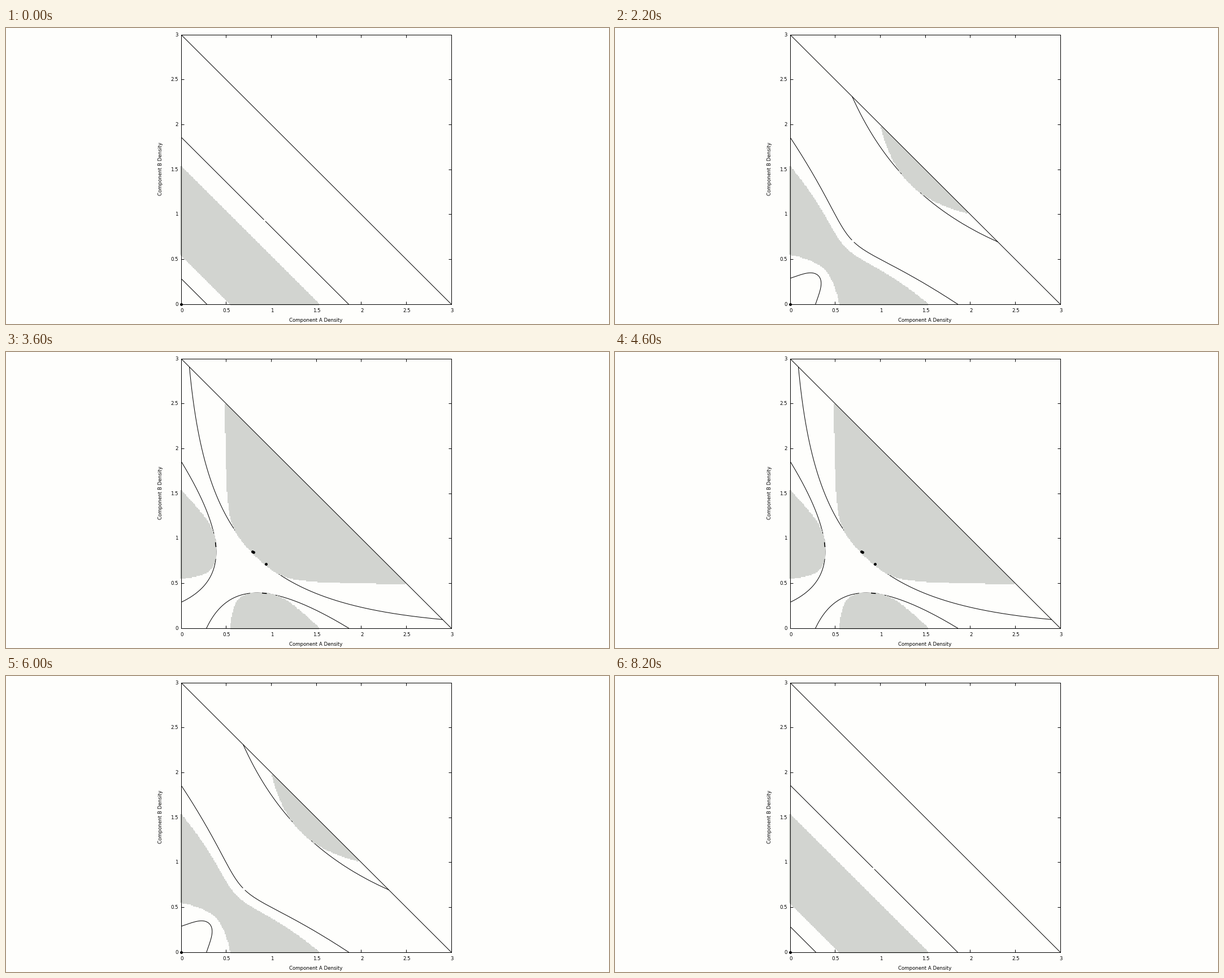
These frames come from a looping animation (1067 by 525 pixels, 8.4 s). A matplotlib script:

```python
import numpy as np
import matplotlib.pyplot as plt
from matplotlib.animation import FuncAnimation

# Phase diagram of a symmetric binary van der Waals fluid at fixed temperature,
# swept back and forth over the strength of the attraction between unlike particles.
W, H, DPI = 1067, 525, 100
LEFT, RIGHT, TOP, BOTTOM = 309.5, 787.5, 11.5, 489.5
STATES, INTERVAL = 21, 200
TEMPERATURE = 0.83
C = 8 * TEMPERATURE / 3
PAPER, GREY = "#fefefc", "#d2d4d0"
PX = 72 / DPI
BREAK = np.full((1, 2), np.nan)


def unstable_points(k):
    """Grid points inside the spinodal (negative Hessian determinant)."""
    axis = np.arange(0, 299) * 0.01
    a, b = np.meshgrid(axis, axis)
    inside = a + b < 2.982
    a, b = a[inside], b[inside]
    rho = a + b
    g = C * (6 - rho) / (3 - rho) ** 2
    det = (C + a * (g - 6)) * (C + b * (g - 6)) - a * b * (g - 6 * k) ** 2
    return np.column_stack([a, b])[det < 0]


def mismatch(x, k):
    """Differences in both activities and the pressure of two phases."""
    a, b = x[..., 0::2], x[..., 1::2]
    rho = a + b
    free = rho / (3 - rho) - np.log(3 - rho)
    za = a * np.exp(free - 6 * (a + k * b) / C)
    zb = b * np.exp(free - 6 * (b + k * a) / C)
    p = 3 * C * rho / (3 - rho) - 3 * (a * a + 2 * k * a * b + b * b)
    return np.stack([q[..., 0] - q[..., 1] for q in (za, zb, p)], axis=-1)


def jacobian(x, k, eps=1e-5):
    d = eps * np.eye(4)
    return ((mismatch(x + d, k) - mismatch(x - d, k)) / (2 * eps)).T


def correct(x, k, rounds):
    for _ in range(rounds):
        x = x - np.linalg.pinv(jacobian(x, k)) @ mismatch(x, k)
    return x


def tangent(x, k):
    return np.linalg.svd(jacobian(x, k))[2][3]


def trace_vapour_liquid(k, step=0.01):
    """Follow the coexisting pair from pure B to the diagonal or critical point."""
    x = correct(np.array([0, 0.29, 0, 1.85]), k, 8)
    t = tangent(x, k)
    t *= np.sign(t[0] + t[2])
    x = x - 0.02 * t
    path = [x]
    for _ in range(600):
        new_t = tangent(x, k)
        t = new_t if new_t @ t > 0 else -new_t
        new = correct(x + step * t, k, 3)
        if not np.all(np.isfinite(new)) or np.linalg.norm(new - x) > 3 * step:
            break
        x = new
        if x[0] >= x[1] or x[2] >= x[3]:
            break
        path.append(x)
        if np.linalg.norm(x[:2] - x[2:]) < 0.05:
            break
    path = np.array(path)
    return path[:, :2], path[:, 2:]


def liquid_liquid(k):
    m = 6 * (1 - k) / C
    if 2 / 3 >= m:
        return BREAK
    r = np.exp(np.linspace(1e-4, 6, 1500))
    y = np.log(r) / (m * (r - 1))
    half = np.column_stack([r * y, y])
    half = half[half.sum(axis=1) <= 3]
    return np.vstack([half[::-1], half[:, ::-1]])


def make_state(n):
    k = 1 - 0.025 * n
    vapour, liquid = trace_vapour_liquid(k)
    tips = BREAK
    if (1 + k) / 2 > TEMPERATURE:
        liquid = liquid[liquid[:, 1] - liquid[:, 0] > 0.019]
        parts = [vapour, vapour[::-1, ::-1], BREAK, liquid, BREAK, liquid[:, ::-1]]
    else:
        loop = np.vstack([vapour, liquid[::-1]])
        parts = [loop, BREAK, loop[:, ::-1]]
        if n >= 18:
            tip = np.vstack([vapour[-1:], liquid[-1:]])
            tips = np.vstack([tip, BREAK, tip[:, ::-1]])
    curves = np.vstack(parts + [BREAK, liquid_liquid(k)])

    dots = np.zeros((1, 2))
    if n >= 18:
        critical = C / (6 * (1 - k))
        dots = critical + np.array([[-0.016, 0.022], [-0.024, 0.03], [0.126, -0.109]])
    return unstable_points(k), curves, tips, dots


states = [make_state(n) for n in range(STATES)]

fig = plt.figure(figsize=(W / DPI, H / DPI), dpi=DPI, facecolor=PAPER)
ax = fig.add_axes([LEFT / W, 1 - BOTTOM / H, (RIGHT - LEFT) / W, (BOTTOM - TOP) / H])
ax.set(xlim=(0, 3), ylim=(0, 3), facecolor=PAPER)
ticks = np.arange(0, 3.1, 0.5)
ax.set_xticks(ticks)
ax.set_yticks(ticks)
ax.tick_params(direction="in", length=5 * PX, width=PX, top=True, right=True,
               labelbottom=False, labelleft=False)
ax.set_axisbelow(True)
for spine in ax.spines.values():
    spine.set_linewidth(PX)


def label(x, y, text, **kw):
    fig.text(x / W, 1 - y / H, text, family="DejaVu Sans", fontsize=8.7 * PX,
             va="baseline", rotation_mode="anchor", **kw)


for v in ticks:
    offset = v / 3 * (RIGHT - LEFT)
    label(LEFT + offset + 1.5, 503.5, f"{v:g}", ha="center")
    label(305, BOTTOM - offset + 3.2, f"{v:g}", ha="right")
label(548.5, 521, "Component A Density", ha="center")
label(275.5, 250, "Component B Density", ha="center", rotation=90)

ax.plot([0, 3], [3, 0], color="black", lw=PX, zorder=2.6)
region, = ax.plot([], [], "s", ms=4 * PX, mew=0, color=GREY, clip_on=False,
                  antialiased=False, zorder=2)
binodal, = ax.plot([], [], color="black", lw=PX, zorder=1.5)
tip_line, = ax.plot([], [], color="black", lw=1.6 * PX, zorder=2.2)
dot_marks, = ax.plot([], [], "o", ms=5 * PX, mew=0, color="black",
                     clip_on=False, zorder=3)
artists = (region, binodal, tip_line, dot_marks)


def update(frame):
    n = min(frame, 2 * STATES - 1 - frame)
    for artist, points in zip(artists, states[n]):
        artist.set_data(points[:, 0], points[:, 1])
    return artists


anim = FuncAnimation(fig, update, frames=2 * STATES, interval=INTERVAL,
                     repeat=True, repeat_delay=0, blit=False)
plt.show()
```
